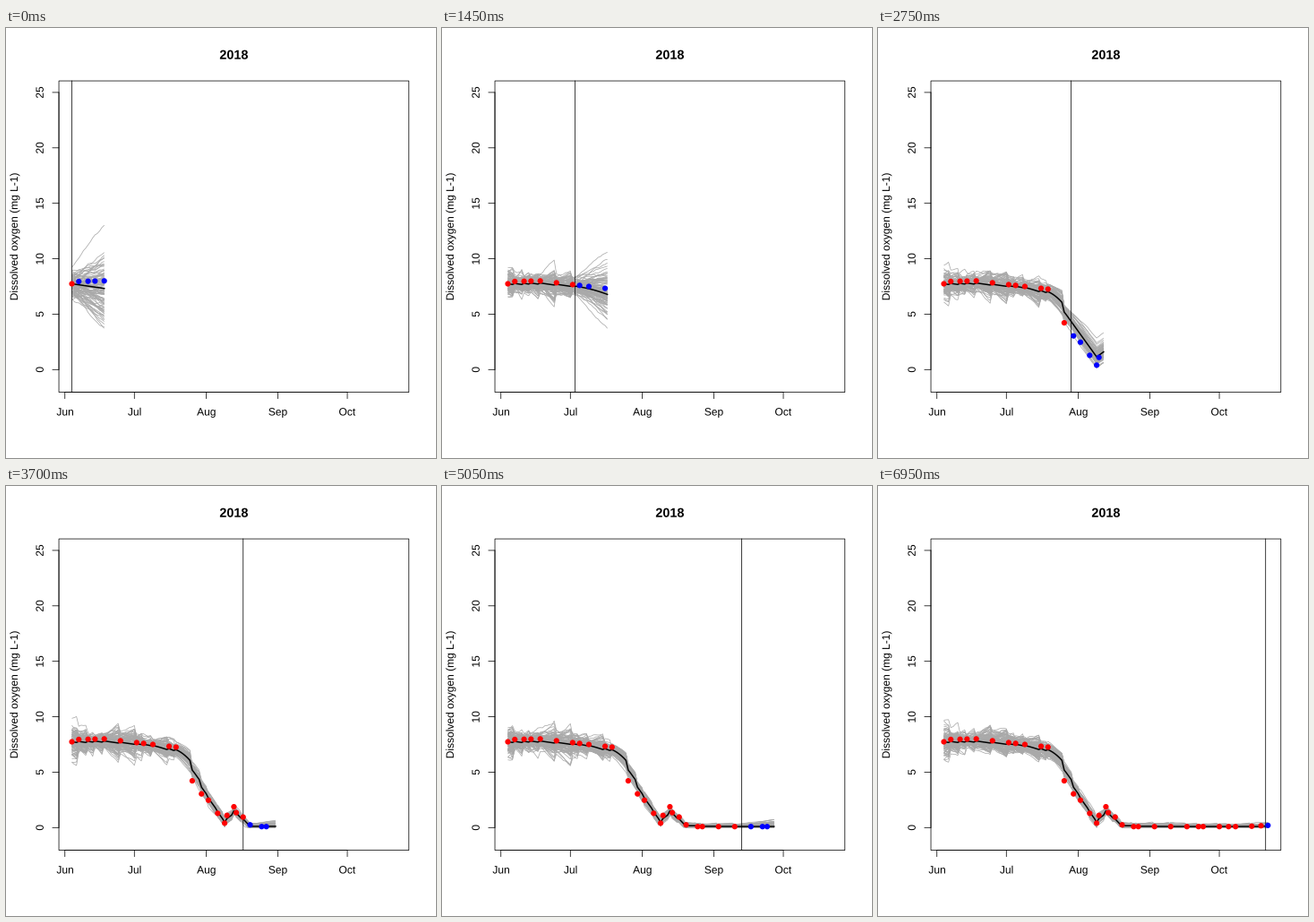
A matplotlib script for the animation above (7000 ms loop, 480 px wide and 480 px high).

```python
import numpy as np
import matplotlib.pyplot as plt
from matplotlib.animation import FuncAnimation
from matplotlib.collections import LineCollection
from matplotlib.patches import PathPatch, Rectangle
from matplotlib.textpath import TextPath
from matplotlib.transforms import Affine2D

plt.rcParams.update({"path.snap": False, "font.family": "Liberation Sans"})

SIZE, DPI = 480, 72
LEFT, RIGHT, TOP, BOTTOM = 59.04, 449.76, 59.04, 406.56
LINE, THIN = 14.4, .75
LAST, HORIZON, MEMBERS = 140, 14, 100
GAIN, FLOOR = .4, .06

DAYS = np.arange(LAST + 1)


def curve(*points):
    """Piecewise linear daily series through (day, value) points."""
    return np.interp(DAYS, *zip(*points))


# Sampled every Monday but one, plus a few extra visits
OBS_DAY = np.array(sorted(set(range(0, LAST + 1, 7)) - {49}
                          | {3, 10, 31, 45, 52, 59, 66, 67, 71, 74, 82, 110, 123, 137}))
OBS = curve((0, 7.74), (3, 7.95), (14, 8), (45, 7.26), (52, 4.22), (56, 3.04), (59, 2.47),
            (66, .4), (67, 1.1), (70, 1.88), (71, 1.35), (74, .95), (77, .25), (82, .09),
            (130, .09), (140, .2))
RATE = curve((0, -.03), (30, -.03), (44, -.08), (46, -.1), (54, -.29), (66, -.29),
             (67, .15), (70, .15), (71, -.22), (77, -.22), (78, 0))
GROWTH = curve((0, .11), (30, .075), (42, .075), (50, .032))
SPREAD = curve((60, 1), (80, .4))


def px(day):
    return LEFT + (RIGHT - LEFT) * (np.asarray(day) + .04 * LAST) / (1.08 * LAST)


def py(val):
    return BOTTOM - (BOTTOM - TOP) * (np.asarray(val) + 2.04) / 28.08


def simulate(today, end):
    """Run the model to `end`, nudged by each observation up to `today`."""
    rng = np.random.default_rng(2018 + today)

    def noise():
        return rng.standard_normal(MEMBERS)

    mean, dev, slope = OBS[0], .62 * noise(), noise()
    means, runs = [mean], [mean + dev]
    for day in range(1, end + 1):
        mean = max(mean + RATE[day], FLOOR)
        dev = dev + GROWTH[day] * (slope + .7 * noise())
        if day <= today and day in OBS_DAY:
            mean += GAIN * (OBS[day] - mean)
            dev = .45 * dev + .22 * noise()
            slope = noise()
        means.append(mean)
        runs.append(np.maximum(mean + SPREAD[day] * dev, .02))
    return np.array(means), np.array(runs).T


fig = plt.figure(figsize=(SIZE / DPI, SIZE / DPI), dpi=DPI, facecolor="white")
ax = fig.add_axes([0, 0, 1, 1])
ax.set(xlim=(0, SIZE), ylim=(SIZE, 0))
ax.axis("off")


def line(x, y):
    ax.plot(x, y, color="black", lw=THIN, solid_capstyle="round", zorder=5)


def label(x, y, text, rot=0, size=12, weight="normal"):
    """Text centred on x, y along its own direction."""
    path = TextPath((0, 0), text, size=size, prop={"weight": weight})
    box = path.get_extents()
    place = (Affine2D().translate(-(box.x0 + box.x1) / 2, 0).rotate_deg(rot)
             .scale(1, -1).translate(x, y))
    ax.add_patch(PathPatch(path.transformed(place), fc="black", lw=0, zorder=5))


ax.add_patch(Rectangle((LEFT, TOP), RIGHT - LEFT, BOTTOM - TOP, fill=False,
                       ec="black", lw=THIN, zorder=5))

months = dict(zip(["Jun", "Jul", "Aug", "Sep", "Oct"], [-3, 27, 58, 89, 119]))
line(px([-3, 119]), [BOTTOM] * 2)
for name, day in months.items():
    line([px(day)] * 2, [BOTTOM, BOTTOM + LINE / 2])
    label(px(day), BOTTOM + 1.8 * LINE, name)

line([LEFT] * 2, py([0, 25]))
for val in range(0, 26, 5):
    line([LEFT - LINE / 2, LEFT], [py(val)] * 2)
    label(LEFT - 1.2 * LINE, py(val), str(val), 90)

label(LEFT - 3.2 * LINE, (TOP + BOTTOM) / 2, "Dissolved oxygen (mg L-1)", 90)
label((LEFT + RIGHT) / 2, 34.7, "2018", size=14.4, weight="bold")

cloud = ax.add_collection(LineCollection([], colors="darkgray", linewidths=THIN, zorder=1),
                          autolim=False)
mean_line, = ax.plot([], [], color="black", lw=2 * THIN, zorder=2)
now, = ax.plot([], [], color="black", lw=THIN, zorder=3)
dots = ax.scatter([], [], s=6.2 ** 2, linewidths=0, zorder=4)


def update(today):
    end = min(today + HORIZON, LAST)
    x = px(DAYS[:end + 1])
    mean, runs = simulate(today, end)
    cloud.set_segments([np.column_stack([x, py(run)]) for run in runs])
    mean_line.set_data(x, py(mean))
    now.set_data([px(today)] * 2, [TOP, BOTTOM])
    shown = OBS_DAY[OBS_DAY <= end]
    dots.set_offsets(np.column_stack([px(shown), py(OBS[shown])]))
    dots.set_facecolor(["red" if day <= today else "blue" for day in shown])
    return cloud, mean_line, now, dots


anim = FuncAnimation(fig, update, frames=LAST, interval=50, repeat=True,
                     repeat_delay=0, blit=False)
plt.show()
```
